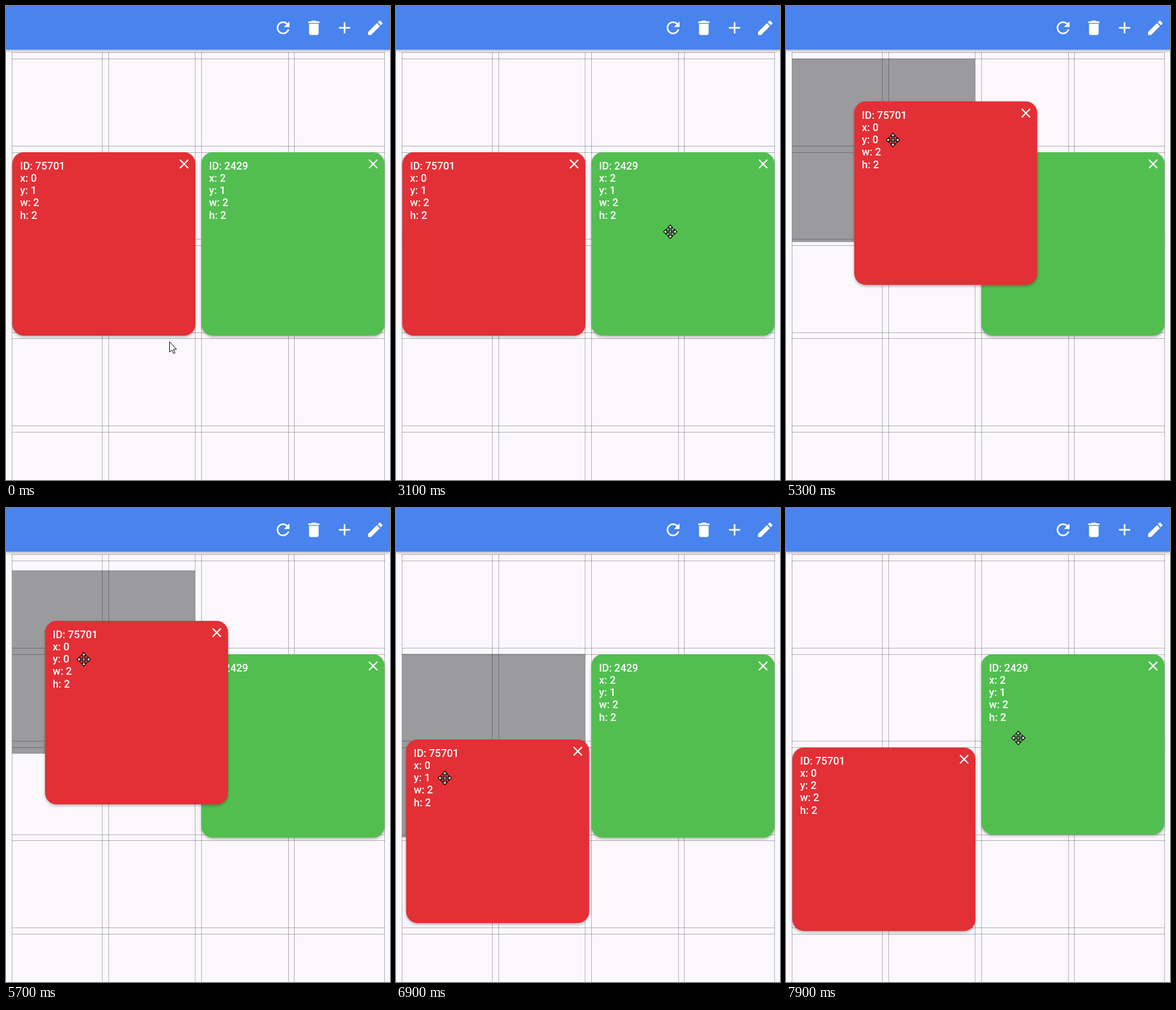
An HTML page that plays this animation: 600x739 px, repeating every 8000 ms.

```html
<!DOCTYPE html>
<html lang="en">
<head>
<meta charset="utf-8">
<title>Draggable grid</title>
<style>
  html, body { margin: 0; width: 100%; height: 100%; overflow: hidden; background: #faf8fc; }
  #stage { position: relative; width: 600px; height: 739px; overflow: hidden; background: #faf8fc; }
  #stage > * { position: absolute; left: 0; top: 0; }
  #grid { width: 600px; height: 739px; stroke: #000; stroke-opacity: .27; }
  #bar { width: 600px; height: 68px; background: #4883ee; box-shadow: 0 2px 4px rgba(0, 0, 0, .3); }
  #bar svg { position: absolute; top: 19px; width: 30px; height: 30px; fill: #fff; }
  #slot { width: 286px; height: 285.5px; background: #000; opacity: .38; }
  .card {
    width: 286px; height: 286px; border-radius: 18px; color: #fff;
    font: 500 16.4px/19.2px Roboto, sans-serif; box-shadow: 0 2px 4px rgba(0, 0, 0, .3);
  }
  .card pre { position: absolute; left: 12px; top: 11.8px; margin: 0; font: inherit; }
  .card svg { position: absolute; right: 5.9px; top: 5.8px; width: 24.6px; height: 24.6px; fill: #fff; }
  #red { background: #e32f36; }
  #green { background: #52be50; transform: translate(305.3px, 228px); }
  .cursor { width: 24px; height: 24px; overflow: visible; fill: #fff; stroke: #111; stroke-linejoin: round; }
  #move { stroke-width: 1.4; }
</style>
</head>
<body>
<div id="stage">
  <svg id="grid"><path id="lines" fill="none"/></svg>
  <div id="bar">
    <svg style="left:417.5px" viewBox="0 0 24 24"><path d="M17.65 6.35C16.2 4.9 14.21 4 12 4c-4.42 0-7.99 3.58-7.99 8s3.57 8 7.99 8c3.73 0 6.84-2.55 7.73-6h-2.08c-.82 2.33-3.04 4-5.65 4-3.31 0-6-2.69-6-6s2.69-6 6-6c1.66 0 3.14.69 4.22 1.78L13 11h7V4z"/></svg>
    <svg style="left:466px" viewBox="0 0 24 24"><path d="M6 19c0 1.1.9 2 2 2h8c1.1 0 2-.9 2-2V7H6zM19 4h-3.5l-1-1h-5l-1 1H5v2h14z"/></svg>
    <svg style="left:514px" viewBox="0 0 24 24"><path d="M19 13h-6v6h-2v-6H5v-2h6V5h2v6h6z"/></svg>
    <svg style="left:561.5px" viewBox="0 0 24 24"><path d="M3 17.25V21h3.75L17.81 9.94l-3.75-3.75zM20.71 7.04c.39-.39.39-1.02 0-1.41l-2.34-2.34c-.39-.39-1.02-.39-1.41 0l-1.83 1.83 3.75 3.75z"/></svg>
  </div>
  <div id="slot"></div>
  <div id="green" class="card"><pre></pre></div>
  <div id="red" class="card"><pre></pre></div>
  <svg id="arrow" class="cursor"><path d="M.5.5V16.5L4.2 13.2 6.7 18.8 9 17.8 6.6 12.2H11.4Z"/></svg>
  <svg id="move" class="cursor"><path id="cross"/></svg>
</div>
<script>
const $ = id => document.getElementById(id);
const LOOP = 8000, STEP = 100, TOP = 82, CELL = 145.5, SIZE = 286;
const EDIT_ON = 2300, GRAB = 4600, SHRINK = 7100, DROP = 7400;
const SLIDE = 200; // how long the slot takes to reach a new row
const GRIP = [60.5, 60];

// Key poses [time, x, y], eased in between
const pointer = [
  [0, 255, 523], [300, 26, 330], [600, 570, 39], [900, 305, 574], [1400, 303, 572],
  [1600, 273, 576], [2000, 273, 576], [2300, 569, 37], [2600, 430, 676], [2800, 430, 676],
  [3100, 428.5, 352], [3700, 58, 235], [4100, 586, 75], [4500, 68.5, 285], [4600, 70.5, 288]
];
const release = [[DROP, 85.5, 461], [7900, 363, 358.5]];
const drag = [
  [GRAB, 10, 228], [5050, 236, 35], [5500, 14, 230], [5700, 61, 176], [6050, 150, 38],
  [6420, 50, 150], [6500, 38, 261], [7100, 8, 396], [DROP, 24, 403.5], [7800, 10, 373.4]
];

const ease = p => p * p * (3 - 2 * p);

function at(keys, t) {
  const i = keys.findIndex(k => k[0] > t);
  if (i < 1) return keys.at(i).slice(1);
  const [t0, x0, y0] = keys[i - 1], [t1, x1, y1] = keys[i];
  const p = ease((t - t0) / (t1 - t0));
  return [x0 + (x1 - x0) * p, y0 + (y1 - y0) * p];
}

const rowAt = t => Math.max(0, Math.floor((at(drag, t)[1] - TOP) / CELL + .02));

// Eased slide of the slot: the recent rows, weighted by the slope of ease()
function slotY(t, n = 40) {
  let sum = 0;
  for (let i = 0; i < n; i++) {
    const p = (i + .5) / n;
    sum += 6 * p * (1 - p) * rowAt(t - p * SLIDE) / n;
  }
  return TOP + sum * CELL;
}

const place = (el, x, y) => { el.style.transform = `translate(${x}px, ${y}px)`; };
const show = (el, on) => { el.style.visibility = on ? 'visible' : 'hidden'; };
const label = (card, id, x, y) => {
  card.firstElementChild.textContent = `ID: ${id}\nx: ${x}\ny: ${y}\nw: 2\nh: 2`;
};
const inside = (x, y, left, top) => x >= left && x <= left + SIZE && y >= top && y <= top + SIZE;

function build() {
  const row = y => `M9 ${Math.floor(y) + .5}H592`;
  const col = x => `M${Math.floor(x) + .5} 72V739`;
  let d = row(72) + row(82) + col(9) + col(591);
  for (let i = 0; i < 4; i++) {
    const step = i * 145.4;
    d += row(218.2 + step) + row(228 + step);
    if (i < 3) d += col(150.5 + step) + col(160 + step);
  }
  $('lines').setAttribute('d', d);

  // One arrow of the move pointer, turned four times
  const arm = [[1, -1], [1, -6], [4.2, -6], [0, -10.5], [-4.2, -6], [-1, -6]];
  const points = [];
  for (let i = 0, c = 1, s = 0; i < 4; i++, [c, s] = [-s, c])
    for (const [x, y] of [...arm].reverse()) points.push([x * c - y * s, x * s + y * c]);
  $('cross').setAttribute('d', `M${points.join('L')}Z`);

  const close = '<svg viewBox="0 0 24 24"><path d="M19 6.41 17.59 5 12 10.59 6.41 5 5 6.41 10.59 12 5 17.59 6.41 19 12 13.41 17.59 19 19 17.59 13.41 12z"/></svg>';
  for (const card of [$('red'), $('green')]) card.insertAdjacentHTML('beforeend', close);
  label($('green'), 2429, 2, 1);
}

function draw(t) {
  const [rx, ry] = at(drag, t);
  const held = t >= GRAB && t <= DROP;
  const [px, py] = held ? [rx + GRIP[0], ry + GRIP[1]] : at(t < GRAB ? pointer : release, t);

  place($('red'), rx, ry);
  label($('red'), 75701, 0, rowAt(t));
  $('green').style.height = (t < SHRINK ? SIZE : 281) + 'px';
  place($('slot'), 9.5, slotY(t));
  show($('slot'), held && t > GRAB);

  const moving = held || t >= EDIT_ON && (inside(px, py, rx, ry) || inside(px, py, 305.3, 228));
  place($('arrow'), px, py);
  place($('move'), px, py);
  show($('arrow'), !moving);
  show($('move'), moving);
}

build();
const start = performance.now();
function tick(now) {
  const t = Math.max(0, now - start) % LOOP;
  draw(Math.floor(t / STEP) * STEP);
  requestAnimationFrame(tick);
}
draw(0);
requestAnimationFrame(tick);
</script>
</body>
</html>
```
